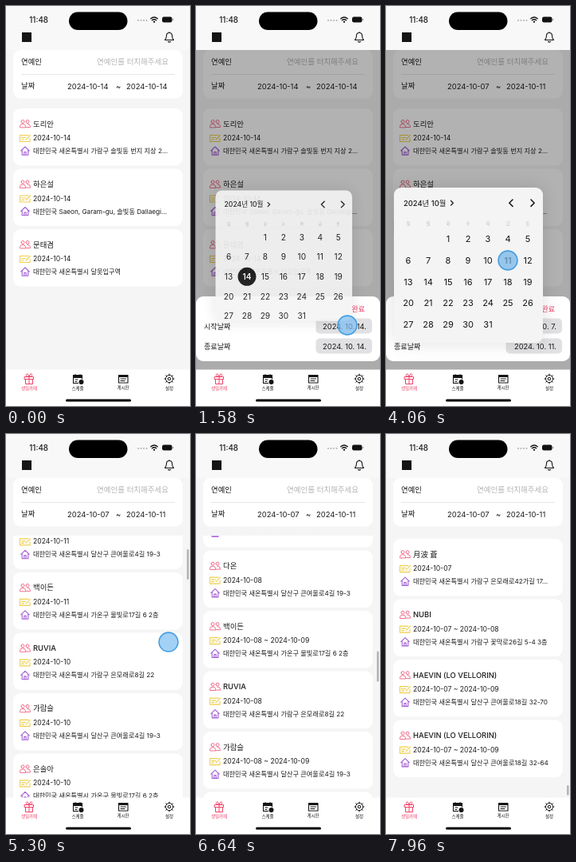
Animation, 231 px wide and 500 px high, one loop 8000 ms. Source, as an HTML page:

```html
<!DOCTYPE html>
<html lang="ko">
<head>
<meta charset="utf-8">
<style>
html, body { margin: 0; width: 100%; height: 100%; overflow: hidden; background: #f5f5f5; }
svg { display: block; width: 231px; height: 500px; }
text { font-family: Inter, "Noto Sans CJK KR", "Noto Sans CJK JP", "Noto Sans CJK", sans-serif; fill: #1b1b1b; }
.bold { font-weight: 500; }
.line { fill: none; stroke: currentColor; stroke-linecap: round; stroke-linejoin: round; }
#panel { fill: #f4f4f4; filter: drop-shadow(0 0 11px rgba(0,0,0,.12)); }
</style>
</head>
<body>
<svg id="stage" viewBox="0 0 231 500"></svg>
<script>
const LOOP = 8000, PITCH = 75.5, MAX_SCROLL = 2463, TAB_TOP = 454.5, PINK = '#ee4268';
const text = (x, y, size, str, attrs = '') => `<text x="${x}" y="${y}" font-size="${size}" ${attrs}>${str}</text>`;
const line = (d, color = '#151515', width = 1) => `<path class="line" d="${d}" color="${color}" stroke-width="${width}"/>`;
const box = (x, y, w, h, fill, r = 0, attrs = '') =>
  `<rect x="${x}" y="${y}" width="${w}" height="${h}" rx="${r}" fill="${fill}" ${attrs}/>`;
const ring = (x, y, r) => `M${x - r} ${y}a${r} ${r} 0 1 0 ${2 * r} 0a${r} ${r} 0 1 0 ${-2 * r} 0`;
const middle = 'text-anchor="middle"';

// List data
const city = '대한민국 새온특별시 ';
const today = [
  ['도리안', city + '가람구 솔빛동 번지 지상 2...', '2024-10-14'],
  ['하은설', '대한민국 Saeon, Garam-gu, 솔빛동 Dallaegi...', '2024-10-14'],
  ['문태겸', city + '달못입구역', '2024-10-14']
];
const known = {
  6: ['나래솔', '대한민국 하늬도 물결시 여울동 1357-24'],
  7: ['쿠모하라 미나세', city + '가람구 은모래로27길 41...'],
  8: ['솔하', city + '가람구 솔빛동 318 62번...'],
  9: ['변유하', city + '별구 남솔대로3가 417번지...', 1],
  10: ['겸우', city + '가온구 물빛로12길 25 3...', 2],
  22: ['새온', '대한민국 바람특별자치도 바람시 노을읍 노을로7...'],
  23: ['하나즈카 레이나', '대한민국 도란시 마루동 472-8번지 2층 도란시...'],
  24: ['HAEVIN', city + '가온구 물빛로31길 8...', 3],
  25: ['루미나포트 단오', '주소 정보가 없습니다', 2],
  26: ['해온별 아라누', city + '가온구 물빛로9길 14', 1],
  33: ['月波 蒼', city + '가람구 은모래로42가길 17...'],
  34: ['NUBI', city + '가람구 꽃막로26길 5-4 3층', 1],
  35: ['HAEVIN (LO VELLORIN)', city + '달산구 큰여울로18길 32-70', 2],
  36: ['HAEVIN (LO VELLORIN)', city + '달산구 큰여울로18길 32-64', 2]
};
const names = ['은솔아', '다온', '백이든', 'RUVIA', '가람슬'];
const streets = ['가람구 은모래로8길 22', '달산구 큰여울로4길 19-3', '가온구 물빛로17길 6 2층'];
const day = n => '2024-10-' + String(n).padStart(2, '0');
const week = Array.from({ length: 37 }, (_, i) => {
  const start = i < 3 ? 11 : i < 8 ? 10 : i < 12 ? 9 : i < 25 ? 8 : 7;
  const [name, address, span = 0] = known[i] || [names[i % 5], city + streets[i % 3], start < 10 ? i % 2 : 0];
  return [name, address, day(start) + (span ? ' ~ ' + day(start + span) : '')];
});
const card = ([name, address, date], i) => `<g transform="translate(9 ${128 + i * PITCH})">
  ${box(0, 0, 213, 71.5, '#fff', 9)}<use href="#rowIcons"/>
  ${text(25, 22.5, 9.4, name, 'class="bold"')}${text(25, 40, 8.6, date)}${text(25, 56, 8.2, address)}</g>`;

const rowIcons = `<g id="rowIcons">
  ${line(ring(12, 16.5, 2) + ring(18, 16.5, 2) + 'M8.5 23.5v-1q0-3 3.5-3t3.5 3v1zM15.5 23.5h6v-1q0-3-3.5-3', '#f0708e')}
  ${line('M19 33.5H8.5v8H21v-4M10.5 36.5h5M10.5 39h3M16 39l5.5-5.5', '#efcf4e', 1.1)}
  ${line('M9.8 53L15 48l5.2 5M11.2 52.5v5.8h7.6v-5.8M13.8 58v-3.5h2.4v3.5', '#a35fd6', 1.1)}</g>`;

// Calendar
const cellX = d => 18 + 25 * ((d + 1) % 7);
const cellY = d => 64 + 26.8 * Math.floor((d + 1) / 7);
const days = Array.from({ length: 31 }, (_, i) => i + 1);
const calendar = `<g id="calendar">
  <clipPath id="calClip"><rect id="calClipBox" width="187" height="194" rx="9"/></clipPath>
  <rect id="panel" width="187" height="194" rx="9"/>
  <g clip-path="url(#calClip)">
  ${text(12, 22.5, 9.4, '2024년 10월', 'class="bold"')}
  ${line('M71.5 16.5l2.8 2.8l-2.8 2.8', '#151515', 1.3)}
  ${line('M149 15l-4.2 4.2l4.2 4.2M172 15l4.2 4.2l-4.2 4.2', '#151515', 1.5)}
  ${[...'일월화수목금토'].map((c, i) => text(18 + 25 * i, 47, 5.5, c, middle + ' style="fill:#bbb"')).join('')}
  <circle id="picked" r="12.5"/>
  ${days.map(d => text(cellX(d), cellY(d) + 4, 11, d, `${middle} class="day"`)).join('')}
  </g></g>`;

const sheetRow = (y, label, id) => text(10, y + 3.5, 9.1, label) +
  box(150.5, y - 9.5, 70.5, 19, '#e1e1e3', 5, `id="${id}Box"`) +
  text(214, y + 3.5, 9.3, '', `id="${id}" text-anchor="end"`);

const header = box(0, 0, 231, 55, '#f8f8f8') + box(79, 7.5, 73.5, 22.5, '#000', 11.25) +
  text(29.3, 20.5, 9.8, '11:48', 'class="bold"') +
  [166, 169.5, 173, 176.5].map(x => `<circle cx="${x}" cy="18" r=".9" fill="#aaa"/>`).join('') +
  line('M181.8 15.8q4.2-3.6 8.4 0M183.4 17.8q2.6-2.2 5.2 0', '#111', 1.4) +
  '<circle cx="186" cy="19.8" r="1.1"/>' + box(196, 13.5, 12.5, 7, '#111', 2.2) + box(209.2, 15.8, 1, 2.4, '#999', .5) +
  box(20, 33, 12, 12, '#151515') +
  line('M199.5 42.5q2-2 2-5.5q0-3.5 3.5-3.5t3.5 3.5q0 3.5 2 5.5zM203.5 44.5q1.5 1.2 3 0M205 33.5v-1', '#151515', 1.1);

const teeth = Array.from({ length: 8 }, (_, i) => {
  const c = Math.cos(i * Math.PI / 4), s = Math.sin(i * Math.PI / 4);
  return `M${205 + 4.7 * c} ${466 + 4.7 * s}L${205 + 6 * c} ${466 + 6 * s}`;
}).join('');
const tabs = box(0, TAB_TOP, 231, 500 - TAB_TOP, '#fff') +
  line('M23.5 463.5h11v3h-11zM24.5 466.5v6h9v-6M29 463.5v9M29 463.5q-5-.5-3.5-3t3.5 3q2-5.5 3.5-3t-3.5 3', PINK) +
  line('M95.5 466v-4.5h-11v10h6M84.5 464.5h11M87 460.5v1M93 460.5v1M87 467h3M87 469.5h2', '#151515', 1.1) +
  box(84.5, 461.5, 11, 2.5, '#151515') + '<circle cx="94.5" cy="470" r="3" fill="#151515"/>' +
  line('M141.5 461.5H153v9.5h-11.5zM144 466h6.5M144 468.5h5', '#151515', 1.1) + box(141.5, 461.5, 11.5, 2.5, '#151515') +
  line(ring(205, 466, 4.6) + ring(205, 466, 1.8) + teeth) +
  text(29, 479.5, 5.5, '생일카페', middle + ` style="fill:${PINK}"`) +
  text(90, 479.5, 5.5, '스케줄', middle) + text(147, 478.5, 5.5, '게시판', middle) + text(205, 479.5, 5.5, '설정', middle) +
  box(75, 491.5, 82, 3, '#000', 1.5);

document.getElementById('stage').innerHTML = `<defs>${rowIcons}
  <clipPath id="listClip"><rect y="127" width="231" height="331"/></clipPath></defs>
  ${box(0, 0, 231, 500, '#f5f5f5')}
  ${box(9, 55, 213, 60.5, '#fff', 9)}${box(19, 85, 193, .7, '#ddd')}
  ${text(19, 73.3, 9.4, '연예인', 'class="bold"')}${text(114, 73.3, 9.5, '연예인를 터치해주세요', 'style="fill:#b4b4b4"')}
  ${text(19, 103.3, 9.4, '날짜', 'class="bold"')}
  ${text(77, 103.5, 9.4, '', 'id="fromDate"')}${text(141, 103.5, 9.4, '~', middle)}${text(151, 103.5, 9.4, '', 'id="toDate"')}
  <g clip-path="url(#listClip)"><g id="todayList">${today.map(card).join('')}</g><g id="weekList">${week.map(card).join('')}</g></g>
  ${box(227, 130, 2.6, 38, '#b5b5b5', 1.3, 'id="thumb"')}
  ${box(0, 55, 231, 403, '#000', 0, 'id="dim"')}
  <g id="sheet">${box(0, 363, 231, 81, '#fff', 9)}
  ${text(212, 382, 9, '완료', `class="bold" text-anchor="end" style="fill:${PINK}"`)}
  ${sheetRow(400, '시작날짜', 'startChip')}${sheetRow(425, '종료날짜', 'endChip')}</g>
  ${calendar}${header}${tabs}
  <circle id="touch" r="11.9" fill="#7fbff2" fill-opacity=".72" stroke="#459fe2" stroke-width="1.6"/>`;

const $ = id => document.getElementById(id);
const dayCells = document.querySelectorAll('.day');
const set = (id, attrs) => { for (const k in attrs) $(id).setAttribute(k, attrs[k]); };
const ramp = (t, a, b) => Math.min(1, Math.max(0, (t - a) / (b - a)));
const ease = (t, a, b) => 1 - (1 - ramp(t, a, b)) ** 3;

// Chips hug their text: a one-digit day is narrower
function setChip(id, date) {
  $(id).textContent = `2024. 10. ${date}.`;
  const x = date < 10 ? 156.5 : 150.5;
  set(id + 'Box', { x, width: 221 - x });
}

// Time and list offset
const scrollKeys = [[5200, 0], [5420, 190], [5820, 350], [6010, 505.5], [6110, 585], [7040, 1490],
  [7250, 1653], [7340, 1740], [7780, 2463], [7960, 2488.5], [8000, 2485]];
function scrollAt(t) {
  const i = scrollKeys.findIndex(k => k[0] > t);
  if (i < 1) return 0;
  const [a, from] = scrollKeys[i - 1], [b, to] = scrollKeys[i], u = ramp(t, a, b);
  return from + (to - from) * u * (1.4 - .4 * u);
}

// Start, end, x, y and, for swipes, the last y
const touches = [[880, 1040, 150, 100], [1400, 1640, 190, 399], [2040, 2220, 53, 293], [2500, 2740, 208, 425],
  [3170, 3440, 205, 425], [3920, 4180, 153, 318], [4210, 4330, 204, 379], [4500, 4660, 204, 379],
  [5200, 5440, 204, 340, 150], [5830, 6110, 204, 271, 78], [7050, 7340, 205, 314, 111]];

function render() {
  const t = performance.now() % LOOP;
  const from = t < 2120 ? 14 : 7, to = t < 4000 ? 14 : 11;
  $('fromDate').textContent = day(from);
  $('toDate').textContent = day(to);
  setChip('startChip', from);
  setChip('endChip', to);

  const loaded = t > 4680, scroll = scrollAt(t), over = Math.max(0, scroll - MAX_SCROLL);
  set('todayList', { visibility: loaded ? 'hidden' : 'visible' });
  set('weekList', { visibility: loaded ? 'visible' : 'hidden', transform: `translate(0 ${-scroll})` });
  set('thumb', { y: 131.6 + .1176 * (scroll - over) + .7 * over, height: 38 - over, opacity: ramp(t, 5200, 5300) });

  const sheet = ease(t, 1000, 1320) - ease(t, 4600, 4820);
  set('dim', { opacity: .3 * sheet });
  set('sheet', { transform: `translate(0 ${96 * (1 - sheet)})` });

  const second = t > 3000;
  const open = second ? ease(t, 3330, 3630) - ease(t, 4220, 4460) : ease(t, 1420, 1720) - ease(t, 2545, 2945);
  const s = .17 + .83 * open, top = (second ? 227 : 204) + 320 * (1 - s);
  set('calendar', {
    transform: `translate(${197 - 11 * (1 - s) - 187 * s} ${top}) scale(${s})`,
    opacity: Math.max(0, 1.2 * s - .2), visibility: open > .005 ? 'visible' : 'hidden'
  });
  set('panel', { height: 194 * s });
  set('calClipBox', { height: 194 * s });
  const picked = second ? to : from;
  set('picked', { cx: cellX(picked), cy: cellY(picked), fill: picked === 14 ? '#151515' : '#d6d6d6' });
  dayCells.forEach((cell, i) => {
    const on = i + 1 === picked;
    cell.style.fontWeight = on ? 600 : 400;
    cell.style.fill = on && picked === 14 ? '#fff' : '#151515';
  });

  const touch = touches.find(([a, b]) => t >= a && t <= b);
  set('touch', { opacity: touch ? Math.min(ramp(t, touch[0], touch[0] + 50), 1 - ramp(t, touch[1] - 50, touch[1])) : 0 });
  if (touch) {
    const [a, b, x, y, lastY = y] = touch;
    set('touch', { cx: x, cy: y + (lastY - y) * ramp(t, a, b) });
  }
  requestAnimationFrame(render);
}
render();
</script>
</body>
</html>
```
